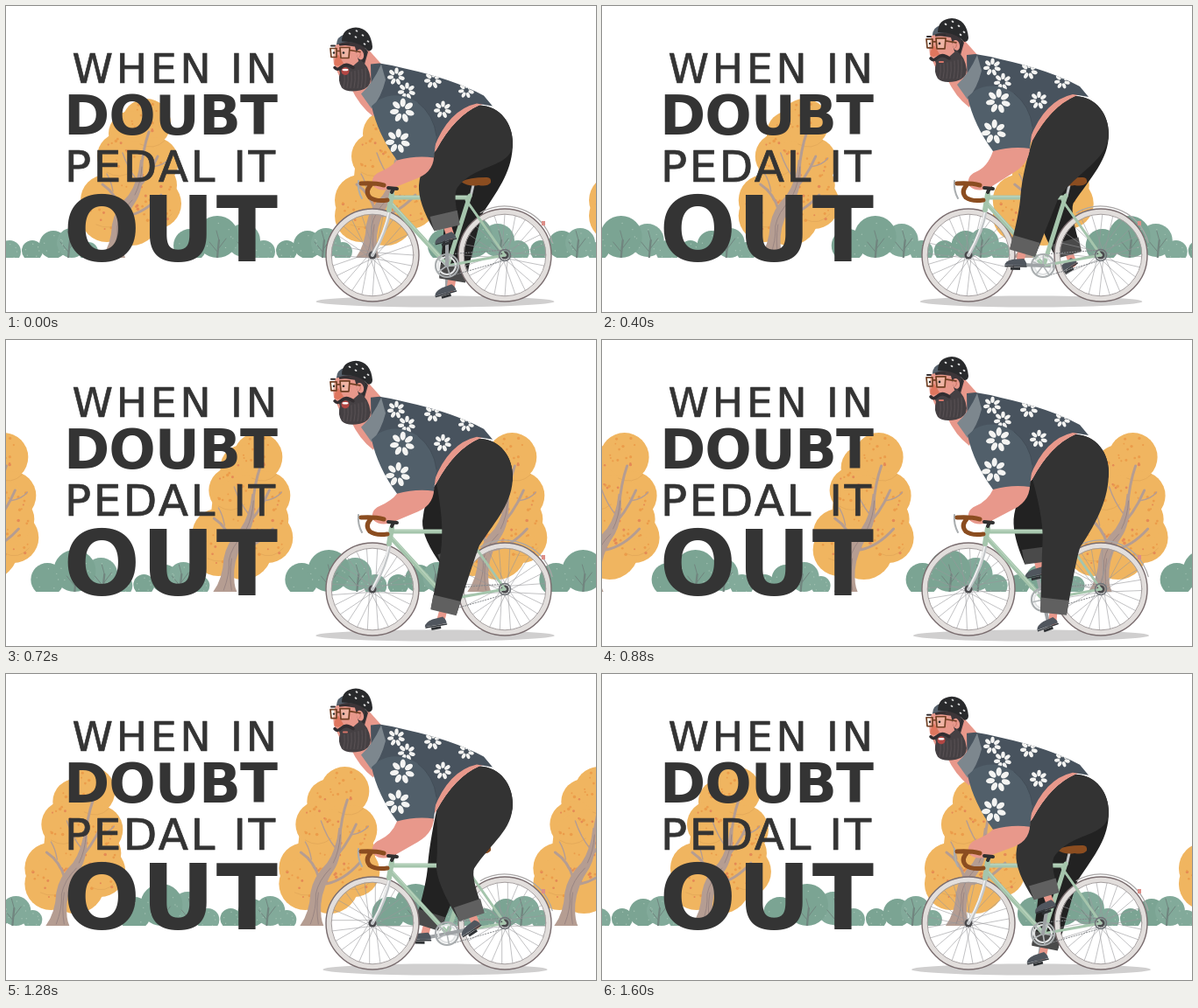
These frames come from a looping animation (673 by 350 pixels, 1.64 s). An HTML page with a canvas:

```html
<!DOCTYPE html>
<html lang="en">
<head>
<meta charset="utf-8">
<title>When in doubt pedal it out</title>
<style>
  html, body { margin: 0; width: 100%; height: 100%; overflow: hidden; background: #fff; }
  canvas { display: block; }
</style>
</head>
<body>
<canvas id="stage" width="673" height="350"></canvas>
<script>
const ctx = document.getElementById('stage').getContext('2d');
const LOOP = 1640, STEP = 40, SPACING = 290, GROUND = 288, TAU = Math.PI * 2;
const SKIN = '#e8988b', GREEN = '#a5c5ac', BROWN = '#8b4d20';
const FRONT = { x: 418, y: 285 }, REAR = { x: 569, y: 285 }, CRANK = { x: 503, y: 297 };

function fill(color, path) {
  ctx.fillStyle = color;
  ctx.fill(typeof path === 'string' ? new Path2D(path) : path);
}
function stroke(color, width, path, cap = 'round') {
  ctx.strokeStyle = color;
  ctx.lineWidth = width;
  ctx.lineCap = cap;
  ctx.lineJoin = 'round';
  ctx.stroke(new Path2D(path));
}
function ellipse(x, y, rx, ry, color, turn = 0) {
  ctx.fillStyle = color;
  ctx.beginPath();
  ctx.ellipse(x, y, rx, ry, turn, 0, TAU);
  ctx.fill();
}
const disc = (x, y, r, color) => ellipse(x, y, r, r, color);
function ring(x, y, r, color, width, from = 0, to = TAU) {
  ctx.beginPath();
  ctx.arc(x, y, r, from, to);
  ctx.strokeStyle = color;
  ctx.lineWidth = width;
  ctx.stroke();
}
function at(x, y, angle, draw) {
  ctx.save();
  ctx.translate(x, y);
  ctx.rotate(angle);
  draw();
  ctx.restore();
}
function seeded(seed) {
  return () => (seed = (seed * 16807) % 2147483647) / 2147483647;
}
const wave = (angle, degrees) => Math.cos(angle - degrees * Math.PI / 180);

// Scenery
const CANOPY = [[75, 134, 28], [58, 146, 26], [46, 172, 27], [84, 178, 28], [62, 195, 40],
  [29, 222, 29], [30, 240, 30], [86, 226, 29], [84, 205, 26], [58, 241, 33]];
const random = seeded(77);
const LEAVES = Array.from({ length: 90 }, () => {
  const [x, y, r] = CANOPY[Math.floor(random() * CANOPY.length)];
  const angle = random() * TAU, reach = Math.sqrt(random()) * r * 0.82;
  return [x + Math.cos(angle) * reach, y + Math.sin(angle) * reach, 0.9 + random() * 0.9];
});

function drawTree() {
  CANOPY.forEach(([x, y, r]) => disc(x, y, r, '#f0b560'));
  stroke('#e5aa5a', 1, 'M30 190Q45 200 60 188M68 158Q84 166 96 154M18 250Q34 258 48 246M76 244Q92 252 104 238');
  LEAVES.forEach(([x, y, r], i) => disc(x, y, r, i % 3 ? '#eb9c4a' : '#e58a55'));
  const bark = '#b59d92';
  fill(bark, 'M24 288Q35 273 36 250Q39 232 55 216Q66 200 68 176L71 176Q73 206 64 222Q50 242 48 263Q47 280 51 288Z');
  stroke(bark, 3, 'M58 216Q76 200 88 172M46 234Q40 214 25 204M54 240Q74 236 92 216M69 190Q71 164 78 144');
  stroke(bark, 1.4, 'M65 200Q54 186 48 168M82 184Q96 182 102 174M37 212Q35 200 30 192');
  stroke('#978380', 0.9, 'M36 286Q43 268 42 252Q45 236 59 222M45 286Q42 270 45 250M62 216Q69 202 70 184');
}
function drawBush(lobes, stems) {
  lobes.forEach(([x, y, r], i) => disc(x, y, r, i % 2 ? '#82aa9a' : '#7ba493'));
  stems.forEach(x => {
    stroke('#71857f', 2.2, `M${x} 288Q${x + 1} 276 ${x + 2} 268`);
    stroke('#71857f', 1, `M${x} 281L${x - 9} 270M${x + 1} 278L${x + 10} 266M${x + 2} 268L${x - 1} 257`);
  });
  lobes.forEach(([x, y, r]) => {
    for (let i = 0; i < 6; i++) {
      disc(x + Math.cos(i * 2.4) * r * 0.65, y + Math.sin(i * 2.4) * r * 0.65, 0.7, '#a4c2b3');
    }
  });
}
function drawScenery(shift) {
  ctx.save();
  ctx.beginPath();
  ctx.rect(0, 0, 673, GROUND);
  ctx.clip();
  for (let k = -2; k <= 2; k++) {
    at(shift + k * SPACING, 0, 0, () => {
      at(86, 0, 0, drawTree);
      drawBush([[211, 274, 19], [272, 268, 19], [242, 264, 24], [295, 281, 13]], [242, 274]);
      drawBush([[321, 280, 12], [385, 281, 11], [345, 273, 16], [366, 271, 17]], [362]);
    });
  }
  ctx.restore();
}

// Lettering
function drawLine(text, x, baseline, weight, size, spacing) {
  ctx.font = `${weight} ${size}px "DejaVu Sans", sans-serif`;
  ctx.letterSpacing = spacing + 'px';
  ctx.fillText(text, x, baseline);
  if (weight === 'normal') ctx.strokeText(text, x, baseline);
}
function drawTitle() {
  ctx.fillStyle = ctx.strokeStyle = '#343434';
  ctx.lineWidth = 0.7;
  drawLine('WHEN IN', 75.5, 88, 'normal', 47, 3.8);
  drawLine('DOUBT', 66, 147, 'bold', 63, -1);
  drawLine('PEDAL IT', 67, 201, 'normal', 50, 2.5);
  drawLine('OUT', 65.5, 292, 'bold', 103, 1.5);
}

// Bicycle
function drawWheel({ x, y }, angle) {
  ctx.beginPath();
  for (let i = 0; i < 24; i++) {
    const a = angle + i * TAU / 24, b = a + (i % 2 ? 1 : -1) * 0.9;
    ctx.moveTo(x + Math.cos(b) * 4, y + Math.sin(b) * 4);
    ctx.lineTo(x + Math.cos(a) * 47, y + Math.sin(a) * 47);
  }
  ctx.strokeStyle = '#97979b';
  ctx.lineWidth = 0.6;
  ctx.stroke();
  ring(x, y, 50, '#e2dedc', 6);
  ring(x, y, 53, '#7a6d6f', 1.4);
  ring(x, y, 46.8, '#a39d9d', 1);
  disc(x, y, 4.5, '#4a4a4d');
  disc(x, y, 1.8, '#c9c9c9');
}
function drawFrame(angle) {
  stroke('#b8bbbd', 2, 'M526 224L569 285');
  stroke(GREEN, 3, 'M525 222L569 285M503 297L569 285');
  ctx.setLineDash([2, 1]);
  stroke('#85888b', 1, 'M503 284L569 279M503 310L569 291', 'butt');
  ctx.setLineDash([]);
  ring(REAR.x, REAR.y, 6.5, '#707478', 1.5);
  ring(REAR.x, REAR.y, 56, '#aaa7a7', 1.2, -2.1, -0.25);
  fill('#dc8e88', 'M611 246h4v5h-4z');
  stroke('#c3c6c8', 4, 'M438 232Q434 258 418 285');
  stroke('#f1f1f1', 1.6, 'M437 234Q432 258 419 282');
  stroke('#c2c5c7', 3, 'M530 218L533 205');
  stroke(GREEN, 5, 'M440 219L527 219M440 227L503 296M529 217L504 296');
  stroke('#c2dbc7', 1, 'M443 218L525 218M441 226L501 293');
  stroke(GREEN, 6, 'M440 215L437 233');
  stroke('#303030', 4, 'M440 213L443 207');
  fill(BROWN, 'M519 201Q529 196 547 196Q554 195 553 202Q549 207 539 205Q528 207 519 201Z');
  ring(CRANK.x, CRANK.y, 13, '#a9adaf', 2.2);
  ring(CRANK.x, CRANK.y, 10, '#e1e3e4', 2);
  for (let i = 0; i < 5; i++) {
    const a = i * TAU / 5 - angle;
    stroke('#b4b8ba', 1.6, `M${CRANK.x} ${CRANK.y}l${Math.cos(a) * 12} ${Math.sin(a) * 12}`);
  }
}
function drawHandlebar() {
  stroke('#303030', 4, 'M436 208L446 209');
  stroke('#a9adaf', 2, 'M402 200Q401 211 406 220');
  stroke(BROWN, 5, 'M405 203Q421 202 431 205M416 205Q409 212 415 219Q422 224 435 222');
}

// Legs: each one follows its pedal around the crank.
function legPose(angle) {
  const pedal = { x: CRANK.x - 30 * Math.sin(angle), y: CRANK.y - 30 * Math.cos(angle) };
  return {
    pedal,
    knee: { x: 507 - 17 * wave(angle, 28), y: 221 - 14 * wave(angle, 9) },
    ankle: { x: pedal.x + 3 + 5 * wave(angle, 130), y: pedal.y - 14 },
    tilt: 0.28 + 0.3 * wave(angle, 270)
  };
}
function drawFoot({ pedal, ankle, tilt }) {
  stroke('#9ea2a5', 4, `M${CRANK.x} ${CRANK.y}L${pedal.x} ${pedal.y}`);
  stroke(SKIN, 9, `M${ankle.x} ${ankle.y - 3}L${pedal.x + 4} ${pedal.y - 4}`);
  at(pedal.x, pedal.y + 2, -tilt, () => {
    fill('#50565e', 'M-14 -1Q-13 -6 -4 -8L8 -9Q12 -4 11 -1Z');
    stroke('#34383d', 1.5, 'M-13 0H11');
    fill('#2f3235', 'M-7 1h11v3h-11z');
  });
}
function drawLeg(pose, dy, color, cuffColor) {
  const { knee, ankle } = pose;
  const dx = ankle.x - knee.x, drop = ankle.y - knee.y, len = Math.hypot(dx, drop);
  const nx = drop / len * 15, ny = -dx / len * 15;
  const left = { x: knee.x - 21, y: knee.y - 2 }, right = { x: knee.x + 22, y: knee.y + 2 };
  const leg = new Path2D();
  drawFoot(pose);
  leg.moveTo(491, 160 + dy);
  leg.quadraticCurveTo(512, 121 + dy, 540, 109 + dy);
  leg.bezierCurveTo(564, 110 + dy, 578, 130 + dy, 578, 152 + dy);
  leg.bezierCurveTo(578, 182 + dy, right.x + 20, right.y - 30, right.x, right.y);
  leg.quadraticCurveTo(right.x - 4, right.y + 10, ankle.x + nx, ankle.y + ny);
  leg.lineTo(ankle.x - nx, ankle.y - ny);
  leg.quadraticCurveTo(left.x - 1, left.y + 20, left.x, left.y);
  leg.quadraticCurveTo(left.x + 2, left.y - 25, 491, 160 + dy);
  fill(color, leg);
  at(ankle.x, ankle.y, Math.atan2(-dx, drop), () => {
    fill(cuffColor, 'M-16 -16L16 -16L15 1L-15 1Z');
  });
}

// Upper body
function drawFlower(x, y, r, petals = 7) {
  for (let i = 0; i < petals; i++) {
    at(x, y, i * TAU / petals + 0.3, () => ellipse(r * 0.65, 0, r * 0.36, r * 0.22, '#f4f4f2'));
  }
}
function drawHead(open) {
  fill(SKIN, 'M376 40Q372 50 374 62L382 80L404 82L414 50L396 34Z');
  fill('#3c3538', 'M377 39Q383 26 400 31L413 48L409 62L402 58L398 42Z');
  fill('#56616c', 'M377 40Q377 30 387 28L396 37Q386 35 377 40Z');
  ellipse(404, 51, 4, 6, SKIN, -0.25);
  stroke('#c97066', 1, 'M403 48Q406 51 403 54');
  fill('#292a2c', 'M383 36Q383 21 399 20Q416 21 418 42Q418 47 413 47Q404 36 383 36Z');
  [[392, 27], [400, 24], [407, 29], [399, 31], [413, 36], [409, 39]].forEach(([x, y]) => ellipse(x, y, 1.5, 1, '#dedede', 0.6));
  stroke('#292a2c', 1.2, 'M411 45Q410 58 401 69');
  fill('#454043', 'M379 66Q386 60 396 64L404 57Q414 63 416 79Q416 89 404 92Q389 95 383 89Q378 81 381 72Z');
  for (let i = 0; i < 7; i++) {
    stroke('#625a5c', 0.7, `M${386 + i * 4} ${73 - i}Q${387 + i * 4} 81 ${385 + i * 4} 89`);
  }
  fill('#df765e', 'M379 51Q373 58 375 63Q380 66 385 61Z');
  stroke('#332e31', 3.5, 'M396 66Q388 60 383 65Q378 70 375 66');
  if (open > 0) {
    ellipse(387, 70, 4.5, 1 + 3.5 * open, '#b24643', -0.2);
    ellipse(387, 68.5, 3.5, 1.3, '#fff');
  } else {
    stroke('#d57468', 2, 'M385 70L389 70');
  }
  ctx.fillStyle = 'rgba(255,245,220,.3)';
  ctx.fillRect(370, 44, 7, 9);
  ctx.fillRect(381, 43, 11, 12);
  stroke('#704025', 1.7, 'M370 44h7v10h-6zM381 43h11l-1 12h-9zM377 47h4M392 46L404 48');
  disc(374, 49, 1.2, '#292929');
  disc(385, 49, 1.3, '#292929');
  stroke('#332e31', 2, 'M381 40L391 39M371 41L375 41');
}
function drawTorso(open) {
  fill(SKIN, 'M486 166Q498 116 532 100L547 107L540 109Q512 121 491 160Z');
  fill(SKIN, 'M393 88L404 46L414 46L430 64L432 92L419 122Q403 110 393 88Z');
  drawHead(open);
  const shirt = 'M416 62L426 61Q440 63 455 67Q510 79 545 98L555 110L537 107Q505 114 488 158L488 172L440 142L417 110Z';
  fill('#48535e', shirt);
  fill('#7d878e', 'M428 62L433 80Q428 100 417 113L405 96Q419 83 428 62Z');
  ctx.save();
  ctx.clip(new Path2D(shirt));
  drawFlower(445, 76, 10);
  drawFlower(457, 93, 10);
  drawFlower(487, 80, 10);
  drawFlower(498, 114, 10);
  drawFlower(525, 92, 9);
  ctx.restore();
}
function drawArm(dy) {
  fill(SKIN, `M446 ${166 + dy}L488 ${162 + dy}Q490 ${184 + dy} 470 ${194 + dy * 0.6}L442 208Q428 214 419 206Q415 195 426 190Q440 184 446 ${172 + dy}Z`);
  at(0, dy, 0, () => {
    fill('#515f6a', 'M425 103Q447 91 470 106Q488 120 491 144L488 169Q468 166 446 172Q424 142 417 110Z');
    stroke('#3f4a54', 0.8, 'M470 106Q488 120 491 144');
    drawFlower(452, 115, 14);
    drawFlower(447, 150, 14);
  });
}

function drawRider(angle) {
  const bounce = 18.6 + 6.6 * wave(2 * angle, -48) + 1.5 * Math.cos(angle);
  const dy = bounce - 20;
  const open = Math.max(0, Math.min(1, (bounce - 21) / 2));
  ellipse(489.5, 338, 131.5 + 5 * wave(2 * angle, -26), 6.5, '#d0cfcf');
  drawLeg(legPose(angle + Math.PI), dy, '#222222', '#4a4a4a');
  drawWheel(FRONT, -angle);
  drawWheel(REAR, -angle);
  drawFrame(angle);
  drawLeg(legPose(angle), dy, '#333333', '#606060');
  at(0, dy, 0, () => drawTorso(open));
  drawArm(dy);
  drawHandlebar();
}

function render(now) {
  const time = Math.floor((now % LOOP) / STEP) * STEP;
  const phase = time / LOOP;
  ctx.fillStyle = '#fff';
  ctx.fillRect(0, 0, 673, 350);
  drawScenery(phase * SPACING - 1);
  drawTitle();
  drawRider(phase * TAU);
}

let start;
function tick(now) {
  start ??= now;
  render(now - start);
  requestAnimationFrame(tick);
}
requestAnimationFrame(tick);
</script>
</body>
</html>
```
